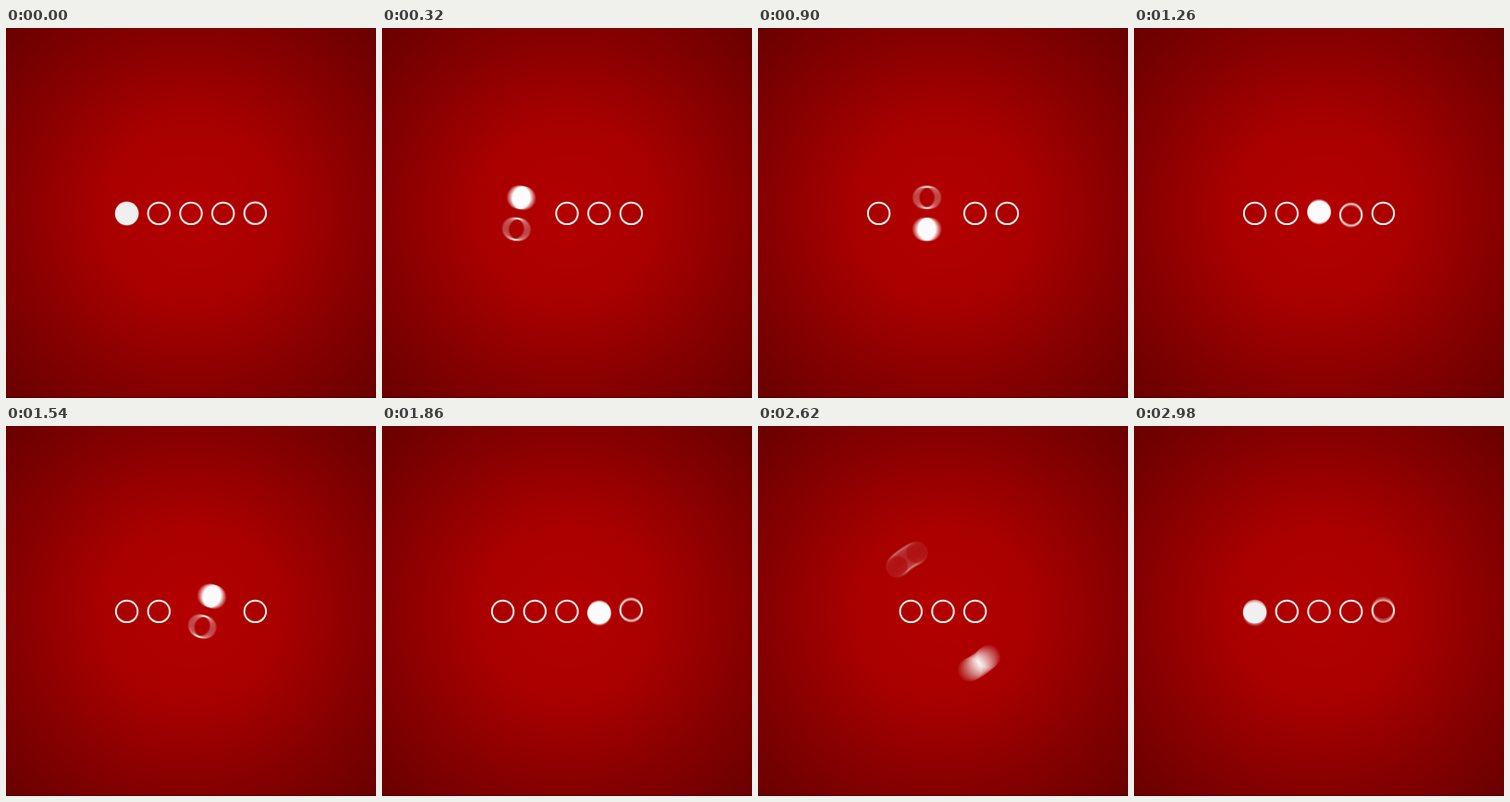
Animation, 400 px wide and 400 px high, one loop 3000 ms. Source, as an HTML page with a canvas:

```html
<!DOCTYPE html>
<html lang="en">
<head>
<meta charset="utf-8">
<title>Loader</title>
<style>
html, body { margin: 0; width: 100%; height: 100%; overflow: hidden; background: #8a0000; }
canvas { display: block; width: 400px; height: 400px; }
</style>
</head>
<body>
<canvas id="stage" width="400" height="400"></canvas>
<script>
const SIZE = 400, LOOP = 3000, SWAP = 600, STEP = 20;
const SHUTTER = 50, SAMPLES = 17;
const CX = 200, CY = 200.4, GAP = 34.7;
const ctx = document.getElementById('stage').getContext('2d');

function makeLayer() {
  const c = document.createElement('canvas');
  c.width = c.height = SIZE;
  return c.getContext('2d');
}
const backdrop = makeLayer(), ringLayer = makeLayer(), discLayer = makeLayer();

const ease = p => p * p * (3 - 2 * p);
const slotX = i => CX + (i - 2) * GAP;

function paintBackdrop() {
  const g = backdrop.createRadialGradient(200, 200, 0, 200, 200, 283);
  g.addColorStop(0, '#b40000');
  g.addColorStop(0.35, '#a80000');
  g.addColorStop(0.7, '#850000');
  g.addColorStop(1, '#690000');
  backdrop.fillStyle = g;
  backdrop.fillRect(0, 0, SIZE, SIZE);
  backdrop.fillStyle = 'rgba(0,0,0,0.2)';
  backdrop.fillRect(0, 398.5, SIZE, 1.5);
}

function ring(c, x, y) {
  c.lineWidth = 2;
  c.beginPath();
  c.arc(x, y, 11.7, 0, Math.PI * 2);
  c.stroke();
}

function disc(c, x, y) {
  c.beginPath();
  c.arc(x, y, 12.8, 0, Math.PI * 2);
  c.fill();
}

// The disc and one ring trade slots on opposite sides of a circle.
function swapAt(time) {
  const t = (time + LOOP) % LOOP;
  const n = Math.floor(t / SWAP);
  const from = n, to = (n + 1) % 5;
  const mid = (slotX(from) + slotX(to)) / 2;
  const h = slotX(from) - mid;
  const side = n === 0 || n === 2 ? -1 : 1;
  const a = Math.PI * ease((t % SWAP) / SWAP);
  const dx = h * Math.cos(a), dy = side * Math.abs(h) * Math.sin(a);
  return { from, to, mid, dx, dy };
}

function clearLayer(c) {
  c.globalCompositeOperation = 'source-over';
  c.globalAlpha = 1;
  c.clearRect(0, 0, SIZE, SIZE);
  c.globalCompositeOperation = 'lighter';
  c.globalAlpha = 1 / SAMPLES;
  c.fillStyle = c.strokeStyle = '#fff';
}

function stamp(c, color) {
  c.globalCompositeOperation = 'source-in';
  c.globalAlpha = 1;
  c.fillStyle = color;
  c.fillRect(0, 0, SIZE, SIZE);
  ctx.drawImage(c.canvas, 0, 0);
}

function draw(t) {
  const poses = [];
  for (let i = 0; i < SAMPLES; i++) {
    poses.push(swapAt(t + SHUTTER * (i / (SAMPLES - 1) - 0.5)));
  }
  const busy = new Set(poses.flatMap(p => [p.from, p.to]));

  ctx.drawImage(backdrop.canvas, 0, 0);
  ctx.strokeStyle = '#eee';
  for (let i = 0; i < 5; i++) if (!busy.has(i)) ring(ctx, slotX(i), CY);

  clearLayer(ringLayer);
  clearLayer(discLayer);
  for (const p of poses) {
    disc(discLayer, p.mid + p.dx, CY + p.dy);
    ring(ringLayer, p.mid - p.dx, CY - p.dy);
    for (const i of busy) {
      if (i !== p.from && i !== p.to) ring(ringLayer, slotX(i), CY);
    }
  }
  const edge = Math.min(1, Math.min(t, LOOP - t) / 300);
  const v = Math.round(239 + 12 * edge);
  stamp(ringLayer, '#eee');
  stamp(discLayer, `rgb(${v},${v},${v})`);
}

paintBackdrop();
const start = performance.now();
function tick() {
  const t = Math.max(0, performance.now() - start) % LOOP;
  draw(Math.floor(t / STEP) * STEP);
  requestAnimationFrame(tick);
}
tick();
</script>
</body>
</html>
```
